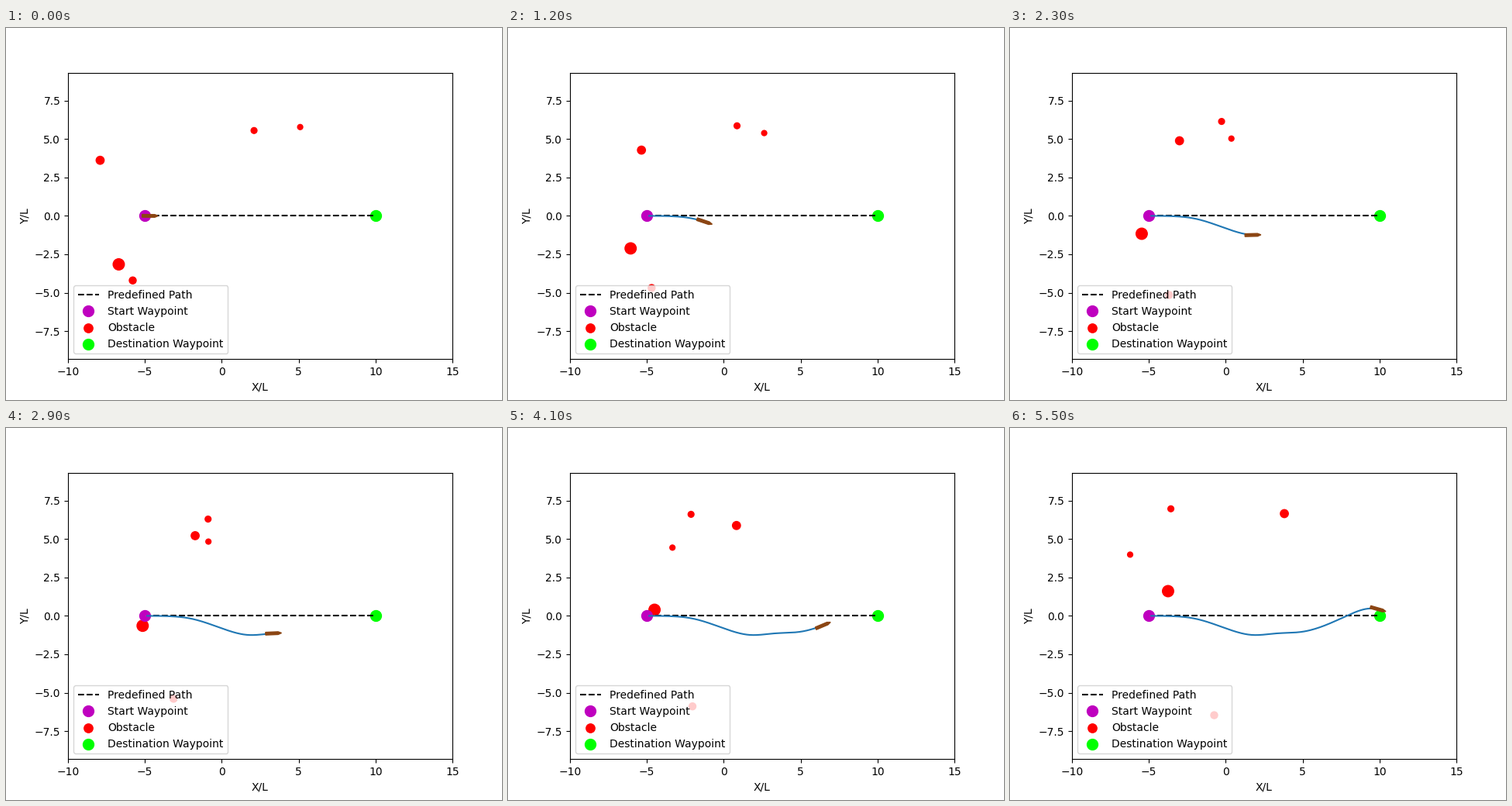
A matplotlib script for the animation above (5600 ms loop, 640 by 480 pixels).

```python
import matplotlib.pyplot as plt
import numpy as np
from matplotlib.animation import FuncAnimation

FRAMES = 56
INTERVAL = 100
HALF_HEIGHT = 9.315

# x, y, step in x, step in y, marker area
OBSTACLES = np.array([
    (-6.70, -3.155, 0.0536, 0.0866, 110),
    (-7.91, 3.614, 0.2131, 0.0552, 56),
    (2.10, 5.55, -0.1031, 0.0257, 31),
    (5.10, 5.776, -0.2058, -0.0326, 24),
    (-5.79, -4.20, 0.0916, -0.0411, 42),
])

# key points of the route the ship follows
ROUTE = np.array([(-5, 0), (-3.5, -0.02), (-2, -0.18), (0, -0.81), (1.7, -1.24),
                  (3.3, -1.14), (5, -1.03), (6.5, -0.6), (8, 0.06), (9.4, 0.48),
                  (10.7, 0.2)])
TRAIL_START = -4.85
LEAD = 0.3  # the heading follows the route slightly ahead

HULL = np.array([(-0.52, -0.09), (0.3, -0.09), (0.52, 0), (0.3, 0.09), (-0.52, 0.09)])


def bends(xs, ys):
    """Second derivatives of the natural cubic spline through the points."""
    h = np.diff(xs)
    system = np.eye(len(xs))
    rhs = np.zeros(len(xs))
    for i in range(1, len(xs) - 1):
        system[i, i - 1:i + 2] = h[i - 1], 2 * (h[i - 1] + h[i]), h[i]
    rhs[1:-1] = 6 * np.diff(np.diff(ys) / h)
    return np.linalg.solve(system, rhs)


BENDS = bends(*ROUTE.T)


def route(x):
    xs, ys = ROUTE.T
    i = np.clip(np.searchsorted(xs, x) - 1, 0, len(xs) - 2)
    h = xs[i + 1] - xs[i]
    b = (x - xs[i]) / h
    a = 1 - b
    curve = (a**3 - a) * BENDS[i] + (b**3 - b) * BENDS[i + 1]
    return a * ys[i] + b * ys[i + 1] + curve * h * h / 6


def ship_x(frame):
    """The ship slows down gently."""
    return -4.66 + 0.29 * frame - 0.000456 * frame**2


def hull_at(x):
    ahead = x + LEAD
    angle = np.arctan2(route(ahead + 0.15) - route(ahead - 0.15), 0.3)
    c, s = np.cos(angle), np.sin(angle)
    return HULL @ np.array([(c, s), (-s, c)]) + (x, route(x))


fig, ax = plt.subplots(figsize=(6.4, 4.8), dpi=100)
ax.set_xlim(-10, 15)
ax.set_ylim(-HALF_HEIGHT, HALF_HEIGHT)
ax.set_xticks(np.arange(-10, 16, 5))
ax.set_yticks(np.arange(-7.5, 8, 2.5))
ax.set_xlabel("X/L")
ax.set_ylabel("Y/L")

ax.plot([-5, 10], [0, 0], "k--", label="Predefined Path")
ax.plot(-5, 0, "mo", markersize=10, label="Start Waypoint")
obstacles = ax.scatter(*OBSTACLES[:, :2].T, s=OBSTACLES[:, 4], color="red",
                       label="Obstacle")
ax.scatter(10, 0, s=100, color="lime", label="Destination Waypoint")
trail, = ax.plot([], [], color="tab:blue")
ship, = ax.fill(*HULL.T, facecolor="saddlebrown", edgecolor="saddlebrown",
                linewidth=1, zorder=3)
ax.legend(loc="lower left")


def draw(frame):
    obstacles.set_offsets(OBSTACLES[:, :2] + frame * OBSTACLES[:, 2:4])
    x = ship_x(frame)
    xs = np.linspace(TRAIL_START, x, 200)
    trail.set_data(xs, route(xs))
    ship.set_xy(hull_at(x))
    return obstacles, trail, ship


anim = FuncAnimation(fig, draw, frames=FRAMES, interval=INTERVAL,
                     repeat=True, repeat_delay=0)
plt.show()
```
